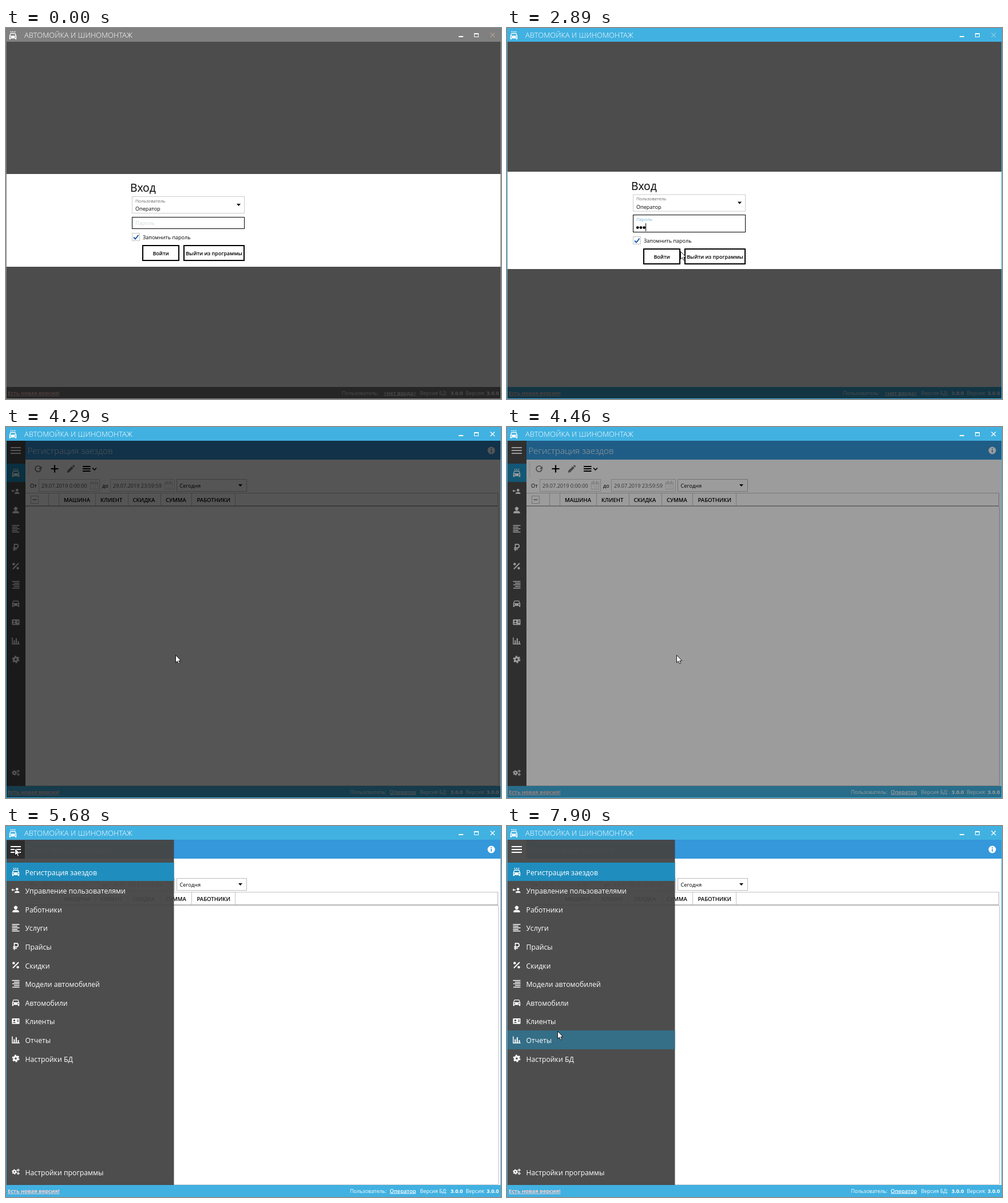
Recreate the animation shown at these times as an HTML page. Size 865 px wide and 648 px high, loop 8000 ms.

```html
<!DOCTYPE html>
<html lang="ru">
<head>
<meta charset="utf-8">
<title>Автомойка и шиномонтаж</title>
<style>
html, body { margin: 0; width: 100%; height: 100%; overflow: hidden; background: #fff; }
svg { display: block; width: 865px; height: 648px; font-family: "Open Sans", "Noto Sans", sans-serif; }
text { white-space: pre; }
</style>
</head>
<body>
<svg id="stage" viewBox="0 0 865 648"></svg>
<script>
const LOOP = 8000, USER = 'Оператор', ROW = 32.6;
const rowTop = i => Math.round(63.6 + ROW * i);

// ---- markup helpers ----
const attrs = o => Object.entries(o).map(([k, v]) => ` ${k}="${v}"`).join('');
const rect = (x, y, w, h, fill, o = {}) =>
  `<rect x="${x}" y="${y}" width="${w}" height="${h}" fill="${fill}"${attrs(o)}/>`;
const box = (x, y, w, h, stroke, o = {}) => rect(x + .5, y + .5, w - 1, h - 1, 'none', { stroke, ...o });
const text = (x, y, size, fill, s, o = {}) =>
  `<text x="${x}" y="${y}" font-size="${size}" fill="${fill}"${attrs(o)}>${s}</text>`;
const path = (d, o = {}) => `<path d="${d}"${attrs(o)}/>`;
const line = (d, stroke, w = 1, o = {}) => path(d, { fill: 'none', stroke, 'stroke-width': w, ...o });
const dot = (x, y, r, o = {}) => `<circle cx="${x}" cy="${y}" r="${r}"${attrs(o)}/>`;
const group = (s, o = {}) => `<g${attrs(o)}>${s}</g>`;
const bold = { 'font-weight': 700 }, semi = { 'font-weight': 600 }, light = { 'font-weight': 300 };
const end = { 'text-anchor': 'end' }, middle = { 'text-anchor': 'middle' };
const under = { 'text-decoration': 'underline' };

// ---- icons, centred on 0,0 ----
const car = path('M-4.6-4.2Q-4.4-5-3.6-5H3.6Q4.4-5 4.6-4.2L6.2 0V6H4V4.4H-4V6H-6.2V0ZM-3.5-3.6L-4.7-.4H4.7L3.5-3.6ZM-4 1a1 1 0 1 0 .01 0ZM4 1a1 1 0 1 0 .01 0Z',
  { 'fill-rule': 'evenodd' });
const wash = group(car, { transform: 'translate(0 1.3)' }) + [-3.4, 0, 3.4].map(x => dot(x, -5.9, 1)).join('');
const lines = xs => line(xs.map((x, i) => `M${x} ${i * 2.9 - 5.8}H${x < -6 ? (i % 2 ? 3 : 6.5) : 6.5}`).join(''), '#fff', 1.5);
const gear = (x, y, r) =>
  dot(x, y, r * .62, { fill: 'none', stroke: '#fff', 'stroke-width': r * .55 }) +
  dot(x, y, r, { fill: 'none', stroke: '#fff', 'stroke-width': r * .4, 'stroke-dasharray': `${r * .55} ${r * .497}` });
const icons = [
  wash,
  dot(2.3, -2.3, 2.3) + path('M-2 4.2Q-2 .8 2.3 .8T6.6 4.2Z') + line('M-6.5 -1H-1.6M-4.8 -2.8L-6.5 -1L-4.8 .8', '#fff', 1.3),
  dot(0, -2, 2.7) + rect(-3.6, -4, 7.2, 1.2, '#fff') + path('M-2.6-4Q0-8 2.6-4ZM-5.7 5.5V3.6Q-4.5 1.4 0 1.4T5.7 3.6V5.5Z'),
  lines([-6.5, -6.5, -6.5, -6.5, -6.5]),
  line('M-2.5 6V-5.5H1.2A3.1 3.1 0 0 1 1.2 .7H-4.6M-4.6 3.2H2', '#fff', 1.6),
  line('M5-5L-5 5', '#fff', 2) + dot(-3.6, -3.6, 2.2) + dot(3.6, 3.6, 2.2),
  lines([-6.5, -3, -5.9, -3, -5.9]),
  car,
  rect(-6.6, -4.7, 13.2, 9.6, '#fff', { rx: 1 }) + dot(-2.5, -1.3, 1.7, { fill: '#4d4d4d' }) +
    path('M-5.4 3.2Q-2.5-.4 .4 3.2Z', { fill: '#4d4d4d' }) + line('M2-2H5.3M2 .6H5.3', '#4d4d4d', 1.2),
  line('M-6-6V5.6H6.8', '#fff', 1.5) + line('M-2.6 5V-1M.9 5V-4.4M4.5 5V.5', '#fff', 2),
  gear(0, 0, 5.4),
];
const gears = gear(-2.3, 0, 3.7) + gear(4.3, -2.9, 2) + gear(4.3, 2.9, 2);
const labels = ['Регистрация заездов', 'Управление пользователями', 'Работники', 'Услуги', 'Прайсы', 'Скидки',
  'Модели автомобилей', 'Автомобили', 'Клиенты', 'Отчеты', 'Настройки БД'];
const at = (x, y, s, o = {}) => group(s, { transform: `translate(${x} ${y})`, fill: '#fff', ...o });

// ---- parts ----
const calendar = x => box(x, 96, 14, 13, '#d5d5d5') + line(`M${x} 99H${x + 14}M${x + 4} 94V98M${x + 10} 94V98`, '#d5d5d5', 2) +
  text(x + 7, 107, 6.5, '#d0d0d0', '15', middle);
const heads = [[101, 'МАШИНА'], [165, 'КЛИЕНТ'], [221.5, 'СКИДКА'], [279, 'СУММА'], [333.5, 'РАБОТНИКИ']];

const page =
  rect(34, 24, 830, 33, '#3498db') + text(37.5, 47, 15.1, '#fff', 'Регистрация заездов', light) +
  dot(848, 41, 6.5, { fill: '#fff' }) + rect(847.2, 40, 1.7, 4.6, '#3498db') + rect(847.2, 37, 1.7, 1.8, '#3498db') +
  line('M39.5 62V88', '#ccc', 2, { 'stroke-dasharray': '1 2' }) +
  group(line('M59.8 69.6A5 5 0 1 0 61 74', 'currentColor', 1.6) + path('M62.4 73.5H56.8L61.8 68.2Z', { fill: 'currentColor' }), { id: 'refresh' }) +
  line('M78.5 73H91.5M85 66.5V79.5', '#000', 2.2) +
  path('M107 79.5V76.6L115 68.6L117.9 71.5L109.9 79.5ZM115.9 67.7L117.2 66.4Q117.8 66 118.3 66.4L120.1 68.2Q120.5 68.7 120.1 69.3L118.8 70.6Z', { fill: '#777' }) +
  line('M134 69H147.5M134 73H147.5M134 77H147.5', '#000', 2) + line('M151 71.5L154.5 75L158 71.5', '#000', 1.6) +
  text(42, 106, 9.2, '#000', 'От') + text(168, 106, 9.2, '#000', 'до') +
  box(57, 91, 107, 22, '#ccc') + text(62, 105.5, 9.1, '#555', '29.07.2019 0:00:00') + calendar(147) +
  box(182, 91, 113, 22, '#ccc') + text(187, 105.5, 9.1, '#555', '29.07.2019 23:59:59') + calendar(277) +
  box(298, 91, 123, 22, '#bbb') + text(303.5, 106, 9.2, '#000', 'Сегодня') + path('M406 100H413L409.5 104Z') +
  line('M34 115.5H860M860.5 139V626', '#c4c4c4') + line('M34 626.5H860', '#d0d0d0') +
  line('M34 138H860', '#b4b4b4', 2) + line('M859.5 115V138', '#b4b4b4') +
  line([74, 92, 156, 213, 270, 324, 400].map(x => `M${x + .5} 116V137`).join(''), '#c4c4c4') +
  box(43, 120, 14, 14, '#bbb') + line('M46.5 127H53.5', '#777', 1.5) +
  heads.map(([x, s]) => text(x, 130.5, 9.5, '#000', s, semi)).join('');

const menu =
  rect(1, 24, 293, 603, '#444', { opacity: .95 }) +
  rect(1, 25, 32, 32, '#2c2c2c', { id: 'burgerHover' }) +
  line('M8 36H26M8 41H26M8 46H26', '#fff', 2) +
  rect(1, rowTop(0), 293, rowTop(1) - rowTop(0), '#1f8ebf') + rect(1, 0, 293, 0, '#356e87', { id: 'rowHover' }) +
  labels.map((s, i) => at(17, 80 + ROW * i, icons[i]) + text(33.5, 85.5 + ROW * i, 12.25, '#fff', s)).join('') +
  at(17, 604, gears) + text(33.5, 609.5, 12.25, '#fff', 'Настройки программы');

const status =
  rect(0, 627, 865, 21, 'currentColor') +
  text(3, 641, 9.2, '#ffd0cc', 'Есть новая версия!', { ...bold, ...under }) +
  text(0, 640.5, 8.95, '#fff', 'Пользователь:', { id: 'userLabel', ...end }) +
  text(716.5, 640.5, 9.3, '#fff', '', { id: 'userName', ...semi, ...under, ...end }) +
  text(771, 640.5, 8.95, '#fff', 'Версия БД:', end) + text(798.5, 640.5, 9.5, '#fff', '3.0.0', { ...bold, ...end }) +
  text(837, 640.5, 8.95, '#fff', 'Версия:', end) + text(861.5, 640.5, 9.5, '#fff', '3.0.0', { ...bold, ...end });

const dialog =
  rect(1, 0, 863, 0, '#fff', { id: 'sheet' }) +
  group(
    text(217, 286, 19.2, '#000', 'Вход') + box(220, 294, 197, 30, '#ccc') +
    text(226, 304.5, 7.6, '#666', 'Пользователь') + text(226, 319, 9.1, '#000', USER) +
    path('M403 307H410L406.5 311Z'), { id: 'upper' }) +
  box(220, 330, 197, 21, '#000', { id: 'field' }) +
  text(226, 344, 9.2, '#000', 'Пароль', { id: 'hint' }) +
  [0, 1, 2].map(i => dot(228.2 + 5.7 * i, 348.6, 2.4, { class: 'pass' })).join('') +
  rect(0, 0, 1, 14, '#000', { id: 'caret' }) +
  group(
    box(220, 358, 14, 14, '#c4c4c4') + line('M223 365.5L226 368.5L231.5 361.5', '#1d5ca5', 2) +
    text(239, 369, 9.05, '#000', 'Запомнить пароль') +
    rect(239, 380, 63, 26, '#fff', { id: 'enter', stroke: '#000', 'stroke-width': 2 }) +
    text(270.5, 397, 9, '#000', 'Войти', { id: 'enterText', ...semi, ...middle }) +
    rect(311, 380, 105, 26, '#fff', { stroke: '#000', 'stroke-width': 2 }) +
    text(363.5, 397, 9, '#000', 'Выйти из программы', { ...semi, ...middle }), { id: 'lower' });

const titleBar =
  rect(0, 0, 865, 24, 'currentColor') + at(12, 12.5, wash) +
  text(32, 17, 12.9, '#fff', 'АВТОМОЙКА И ШИНОМОНТАЖ', light) +
  rect(791, 14, 8, 2, '#fff') + box(818, 9, 8, 7, '#fff') + rect(818, 9, 8, 2, '#fff') +
  line('M846.5 8.5L854 16M854 8.5L846.5 16', '#fff', 1.3, { id: 'close' });

const cursor = group(
  path('M.5 .5V13.6L3.5 10.9L5.5 15.5L7.7 14.5L5.8 10.2H9.8Z', { id: 'arrow', fill: '#fff', stroke: '#000', 'stroke-width': .9 }) +
  line('M-3-7.5H-1L0-6.5L1-7.5H3M0-6.5V6.5M-3 7.5H-1L0 6.5L1 7.5H3', '#000', 1, { id: 'beam' }), { id: 'cursor' });

const stage = document.getElementById('stage');
stage.innerHTML =
  '<clipPath id="paneClip"><rect id="paneBox" x="1" y="24" width="33" height="603"/></clipPath>' +
  rect(0, 0, 865, 648, '#fff') +
  group(group(page) + group(menu, { 'clip-path': 'url(#paneClip)' }), { id: 'app' }) + status +
  rect(0, 24, 865, 623, '#000', { id: 'shade' }) + group(dialog, { id: 'dialog' }) + titleBar +
  line('M.5 24V648M864.5 24V648M0 647.5H865', 'currentColor') + cursor;

// ---- timeline ----
const $ = id => document.getElementById(id);
const set = (id, o) => { for (const k in o) $(id).setAttribute(k, o[k]); };
const show = (el, on) => el.setAttribute('visibility', on ? 'inherit' : 'hidden');
const mix = (a, b, k) => a + (b - a) * k;

// pointer runs: start, end, number of steps
const runs = [[200, 950, 11], [2570, 3200, 9], [4920, 5430, 8], [6040, 6830, 11], [6900, 7650, 11], [7740, 7900, 3]];
const track = [[125, 799, 669], [950, 334, 347], [2490, 334, 347], [2885, 303, 390], [3200, 296, 398],
  [4850, 296, 398], [5430, 15, 38], [5965, 15, 38], [6830, 86, 238], [6975, 87, 253], [7650, 88, 335], [7900, 88, 358]];

function pointer(t) {
  const run = runs.filter(r => r[0] <= t).pop();
  if (!run) return null;
  const [a, b, n] = run, d = (b - a) / (n - 1);
  const q = Math.min(b, a + Math.floor((t - a) / d + 1e-6) * d);
  const i = Math.max(1, track.findIndex(p => p[0] >= q));
  const [t0, x0, y0] = track[i - 1], [t1, x1, y1] = track[i], k = (q - t0) / (t1 - t0);
  return [mix(x0, x1, k), mix(y0, y1, k)];
}

function draw(t) {
  const [x, y] = pointer(t) || [-99, -99];
  const inApp = t >= 3600, focused = t < 3350;
  const grow = t < 2090 ? 0 : t < 2170 ? .5 : 1;
  const typed = [2090, 2250, 2330].filter(s => t >= s).length;

  stage.style.color = t < 1170 ? '#808080' : '#41b1e1';
  set('close', { stroke: t < 1170 ? '#b39c92' : t < 3760 ? '#86c9e6' : '#fff' });
  set('userLabel', { x: inApp ? 665 : 651 });
  $('userName').textContent = inApp ? USER : '<нет входа>';

  show($('app'), inApp);
  const fade = t < 4290 ? .7 : t < 4520 ? .667 - .1385 * Math.floor((t - 4290) / 85) : 0;
  set('shade', { opacity: fade });

  show($('dialog'), t < 4180);
  set('dialog', { opacity: t < 3760 ? 1 : Math.max(0, 1 - (Math.floor((t - 3760) / 76) + 1) / 6) });
  set('sheet', { y: 255 - 4 * grow, height: 162 + 8 * grow });
  set('upper', { transform: `translate(0 ${-3.5 * grow})` });
  set('lower', { transform: `translate(0 ${6 * grow})` });
  set('field', { y: 330.5 - 4 * grow, height: 20 + 10 * grow, stroke: focused ? '#000' : '#ccc' });
  set('hint', { y: 344 - 7 * grow, 'font-size': 9.2 - 1.55 * grow, fill: grow ? '#72b5d8' : '#cbdcd8' });
  stage.querySelectorAll('.pass').forEach((el, i) => show(el, i < typed));
  set('caret', { x: typed ? 225 + 5.7 * typed : 224, y: 333 + 8 * grow });
  show($('caret'), t >= 1170 && t < 1720 || t >= 2090 && t < 2950);

  const pressed = t >= 3350 && t < 3440;
  const overEnter = x >= 238 && x < 303 && y >= 385 && y < 413;
  set('enter', { fill: pressed ? '#000' : overEnter ? '#ebebeb' : '#fff' });
  set('enterText', { fill: pressed ? '#fff' : '#000' });

  $('refresh').style.color = t < 4610 ? '#777' : '#222';
  const open = t >= 5590, paneW = t < 5590 ? 33 : t < 5680 ? 200 : 292.5;
  set('paneBox', { width: paneW });
  show($('burgerHover'), x > 0 && x < 34 && y >= 25 && y < 57);
  const row = Math.floor((y - rowTop(0)) / ROW);
  show($('rowHover'), open && row > 0 && row < labels.length);
  set('rowHover', { y: rowTop(row), height: rowTop(row + 1) - rowTop(row) });

  const beam = t < 2885 && x > 220 && x < 417 && y > 330 && y < 351 + 6 * grow;
  set('cursor', { transform: `translate(${Math.round(x)} ${Math.round(y)})` });
  show($('arrow'), !beam);
  show($('beam'), beam);
}

const begin = performance.now();
function tick() {
  draw((performance.now() - begin) % LOOP);
  requestAnimationFrame(tick);
}
tick();
</script>
</body>
</html>
```
